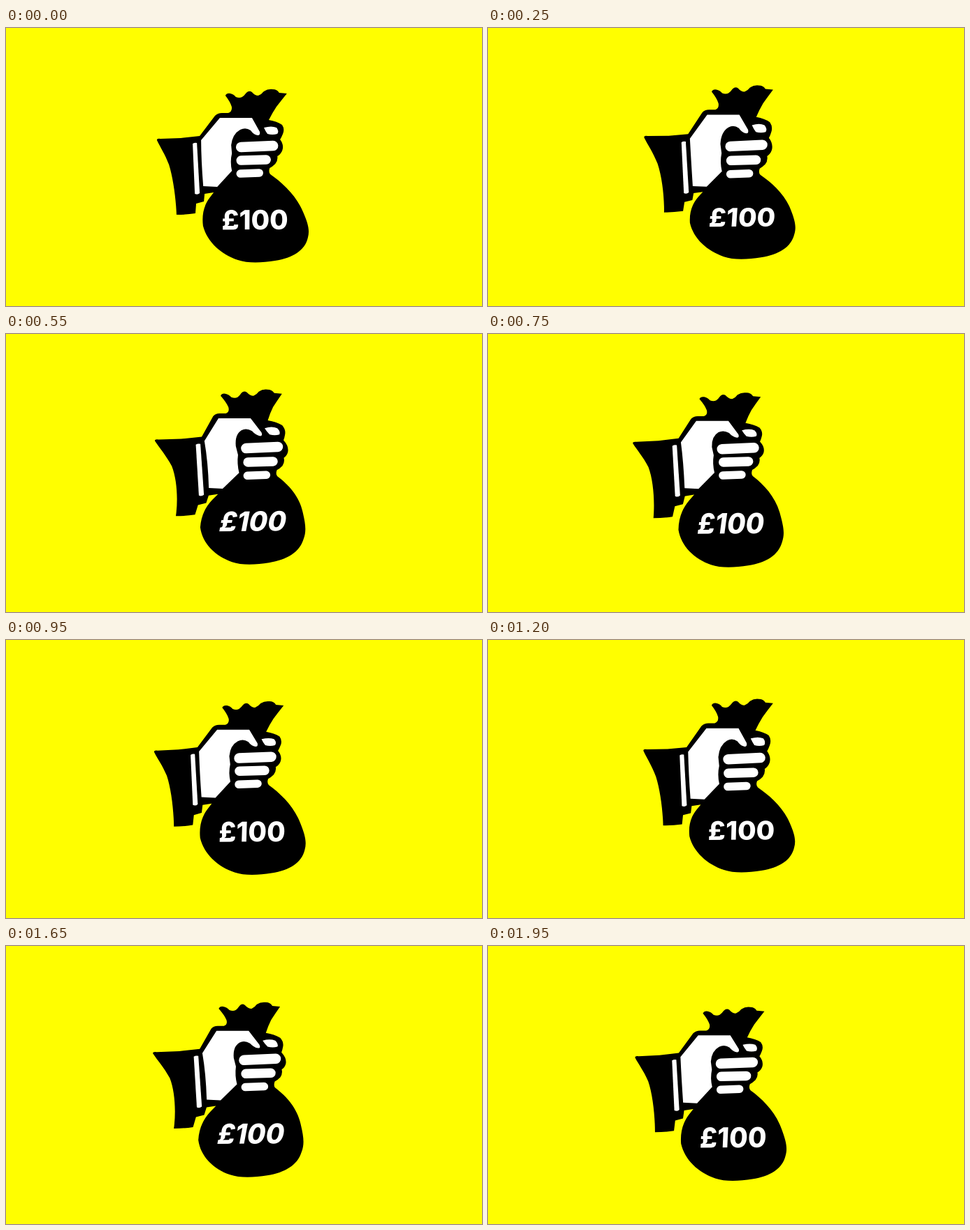
An HTML page that plays this animation: 681 px wide and 399 px high, repeating every 2 s.

```html
<!DOCTYPE html>
<html lang="en">
<head>
<meta charset="utf-8">
<title>Money bag</title>
<style>
  html, body { margin: 0; width: 100%; height: 100%; overflow: hidden; background: #fffe00; }
  svg { display: block; width: 681px; height: 399px; }
  text { font: 800 38.5px Inter, "Liberation Sans", sans-serif; fill: #fff; }
  .finger { fill: none; stroke: #fff; stroke-linecap: round; }
</style>
</head>
<body>
<svg id="stage" viewBox="0 0 681 399">
  <!-- sleeve, hand and bag silhouette -->
  <path d="M216 161 Q216 158 221 159 L250 158 L277 155 L299 126 Q303 122 309 122 L318 122
    Q324 120 323 113 Q321 106 314 97 Q316 93 321 94 Q326 95 329 99 Q334 101 338 99
    Q341 97 344 93 Q348 89 352 92 Q356 97 361 97 Q366 95 369 91 Q375 87 382 88
    Q388 88 391 93 L402 94 Q394 104 387 113 Q381 122 376 132 Q388 134 395 139
    Q399 145 396 152 Q394 157 392 160 Q398 168 395 176 Q393 181 388 184
    Q389 190 385 195 Q381 199 377 201 Q375 207 378 210 C395 222 415 240 425 264
    C432 280 435 290 432 301 C428 319 411 330 385 334 C367 337 346 338 332 333
    C308 325 288 307 282 284 C280 268 283 255 291 244 L297 236 L284 238 L283 249
    L272 252 L271 266 Q258 268 244 268 C243 245 239 215 233 196 C227 180 221 172 216 161 Z"/>
  <!-- cuff -->
  <path fill="#fff" d="M267 166 Q270 164 273 165 L277 237 Q274 240 270 238 Z"/>
  <!-- back of the hand and thumb -->
  <path fill="#fff" d="M306 129 L352 129 L363 149 Q364 154 360 154 Q354 153 350 147
    Q343 142 335 146 Q324 152 322 168 L323 180 Q320 192 323 205 L302 228 L282 227
    Q279 190 279 161 Z"/>
  <path fill="#fff" d="M369 143 Q380 140 387 143 Q391 148 388 152 Q381 154 374 152 Q371 148 369 143 Z"/>
  <path class="finger" stroke-width="14.5" d="M336 171 L382 169"/>
  <path class="finger" stroke-width="13.5" d="M336 190 L372 189"/>
  <path class="finger" stroke-width="11.5" d="M335 209 L362 208"/>
  <text id="amount" x="-0.5" y="-0.5">£100</text>
</svg>
<script>
  const LOOP = 2000, STEP = 50, SWING = 1035;
  const amount = document.getElementById('amount');
  const shapes = [...document.querySelectorAll('path')].map(el => ({ el, d: el.getAttribute('d') }));
  const bell = (y, mid, width) => Math.exp(-(((y - mid) / width) ** 2));

  // The whole drawing circles while a soft ripple passes through the fist.
  function makeWarp(time) {
    const a = time / SWING * 2 * Math.PI;
    const shiftX = 8 * Math.sin(a + 0.08) - 0.7;
    const shiftY = 4 * Math.cos(a + 0.1) - 4;
    const bend = (1 - Math.cos(a - 0.3)) / 2;
    const lift = 4.2 * Math.sin(a);
    return (px, py) => {
      const x = px - 216, y = py - 159;
      const grip = Math.min(1, 0.43 + 0.0085 * x + 0.003 * y);
      return [
        px + shiftX + bend * (20 * grip * bell(y, 42, 72) - 6.5),
        py + shiftY + lift * (1.25 * grip * bell(y, 45, 60) - 0.3)
          + bend * (2.5 * grip * bell(y, 45, 40) + 0.01 * y)
      ];
    };
  }

  function draw(time) {
    const warp = makeWarp(time);
    for (const { el, d } of shapes) {
      el.setAttribute('d', d.replace(/(\d+) (\d+)/g,
        (_, x, y) => warp(+x, +y).map(n => n.toFixed(2)).join(' ')));
    }
    const [ox, oy] = warp(309, 290);
    const [rx, ry] = warp(403, 289.3);
    const [tx, ty] = warp(309, 262);
    const matrix = [(rx - ox) / 94, (ry - oy) / 94, (ox - tx) / 28, (oy - ty) / 28, ox, oy];
    amount.setAttribute('transform', `matrix(${matrix.join(' ')})`);
  }

  const start = performance.now();
  function tick() {
    const time = (performance.now() - start) % LOOP;
    draw(Math.floor(time / STEP) * STEP);
    requestAnimationFrame(tick);
  }
  tick();
</script>
</body>
</html>
```
